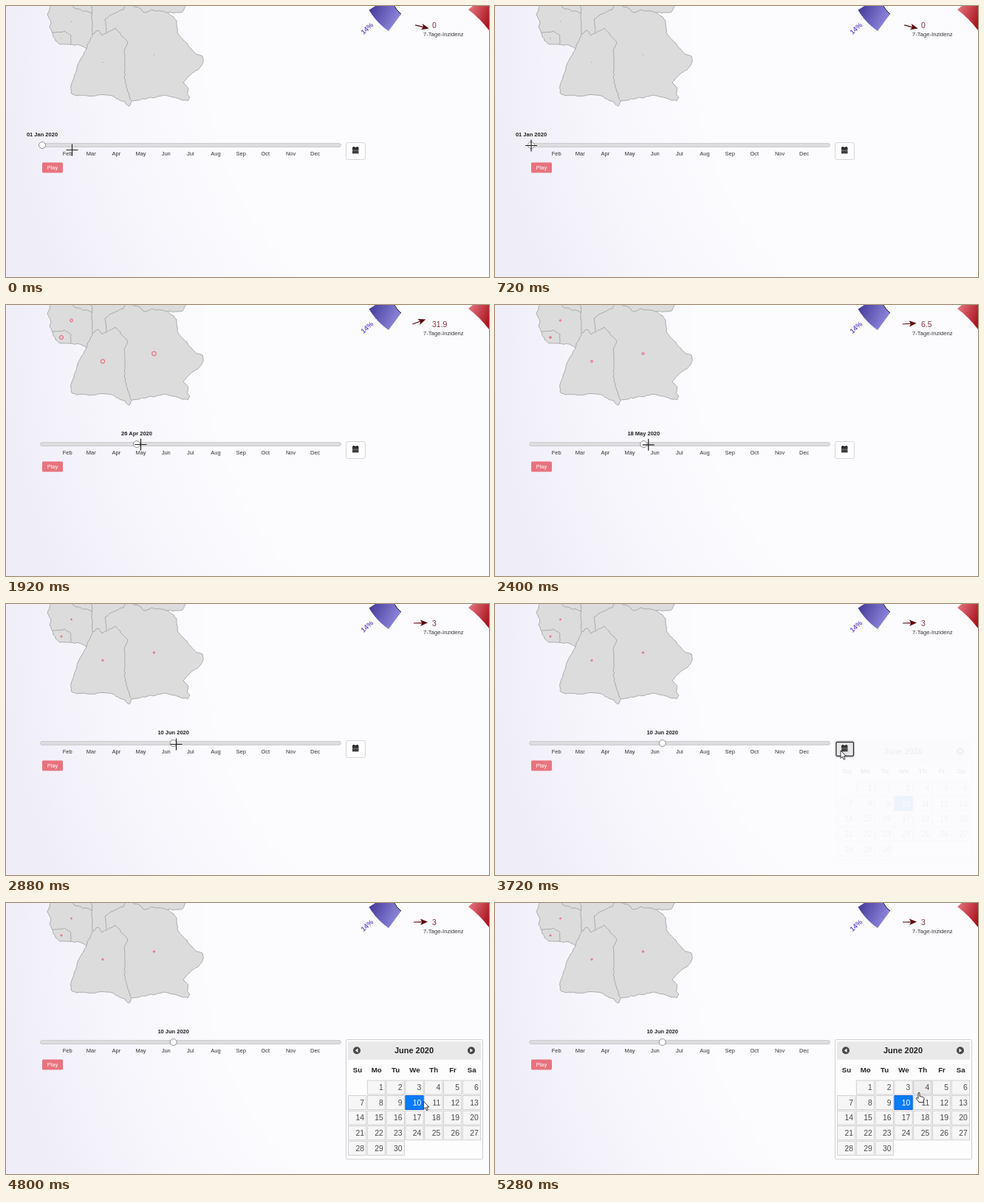
An HTML page for the animation above (5.4 s loop, 654 by 368 pixels).

```html
<!DOCTYPE html>
<html lang="de">
<head>
<meta charset="utf-8">
<title>7-Tage-Inzidenz</title>
<style>
  html, body { margin: 0; width: 100%; height: 100%; overflow: hidden; }
  body { background: radial-gradient(circle at 732px 50px, #fcfbfe 463px, #fbfafd 468px, #f7f6fc 600px, #efeef8 740px); }
  svg { display: block; width: 654px; height: 368px; }
  text { font-family: "Liberation Sans", Arial, sans-serif; fill: #333; }
  .mid { text-anchor: middle; }
  .end { text-anchor: end; }
  .bold { font-weight: bold; fill: #222; }
  .small { font-size: 7.5px; }
  .land { fill: #dcdcdc; stroke: #a4a4a4; stroke-width: .9; stroke-linejoin: round; }
  .border { fill: none; }
  .cell { fill: #f6f6f6; stroke: #cdcdcd; stroke-width: .9; }
  .hover { fill: #ebebeb; stroke: #c0c0c0; }
  .picked { fill: #087cfa; stroke: #0456d8; }
  .cursor { fill: #fff; stroke: #222; stroke-width: .9; stroke-linejoin: round; }
</style>
</head>
<body>
<svg viewBox="0 0 654 368">
  <defs>
    <linearGradient id="violet" x1="0" y1=".2" x2="1" y2=".6">
      <stop offset="0" stop-color="#463d9c"/>
      <stop offset="1" stop-color="#958de2"/>
    </linearGradient>
    <linearGradient id="red" x1="0" y1=".2" x2="1" y2=".7">
      <stop offset="0" stop-color="#e4717b"/>
      <stop offset="1" stop-color="#a8141f"/>
    </linearGradient>
  </defs>

  <g id="map"></g>

  <path fill="url(#violet)" d="M500 0L491.5 5.5Q502 23 518 34L535 11Q529 6 525.5 0Z"/>
  <path fill="none" stroke="#14122c" d="M526 0Q529 6 535 11"/>
  <path fill="url(#red)" d="M632 0L626 5Q641 16 654 33V0Z"/>
  <text class="mid bold" font-size="9.5" style="fill:#7558d2" transform="translate(491 33) rotate(-42)">14%</text>
  <path id="needle" fill="#5e0710" d="M-9.5 -.6H1.5L-.5 -4.2L9.5 0L-.5 4.2L1.5 .6H-9.5Z"/>
  <text id="value" x="577" y="29.5" font-size="10.5" style="fill:#843442"></text>
  <text x="565" y="41" font-size="7.7">7-Tage-Inzidenz</text>

  <rect x="46.5" y="186.5" width="407" height="5" rx="2.5" fill="#dddcde" stroke="#c4c3c6" stroke-width=".8"/>
  <g id="months"></g>
  <g id="handle">
    <text id="date" class="mid bold small" y="177"></text>
    <circle cy="189" r="4.5" fill="#fff" stroke="#858585" stroke-width=".9"/>
  </g>
  <rect x="49" y="212.5" width="28" height="14" rx="1.5" fill="#e8737e"/>
  <text class="mid small" x="63" y="222.3" style="fill:#fff">Play</text>

  <rect id="button" x="460.5" y="185.5" width="26" height="23" rx="2.5" stroke="#d8d8dc"/>
  <rect id="focus" x="462" y="187.5" width="23.5" height="19" rx="1.5" fill="#e9e9ea" stroke="#222" stroke-width="1.3"/>
  <path id="icon" stroke="#222" stroke-width="1.8" d="M469 193H477.500M469 195.200H477.500M469 197.300H477.500M469 199.300H477.500M471 191V193M475.500 191V193"/>

  <g id="calendar">
    <rect x="460.5" y="185.5" width="185" height="162.5" rx="2" fill="#fdfdfe" stroke="#cfcfd2"/>
    <rect x="463" y="188" width="180" height="25" rx="2" fill="#e9e9e9"/>
    <g fill="#484848"><circle cx="475" cy="200.3" r="5"/><circle cx="630" cy="200.3" r="5"/></g>
    <path fill="#fff" d="M476.5 197.6v5.4l-3.6-2.7zM628.5 197.6v5.4l3.6-2.7z"/>
    <text class="mid bold" x="552.5" y="204" font-size="11">June 2020</text>
  </g>

  <path id="cross" class="cursor" style="stroke-width:1.2" d="M-8 0H8M0 -8V8"/>
  <path id="arrow" class="cursor" d="M0 0V10.5L2.5 8.3L4.3 12.3L6 11.5L4.3 7.7H7.5Z"/>
  <path id="hand" class="cursor" d="M-1 1Q0 -.6 1 1V5.5L5.5 6.5Q7.2 7 7 9L6 13.5H0L-3.8 8.5Q-4 7 -2.5 7.3L-1 8.6Z"/>
</svg>

<script>
const LOOP = 5400, STEP = 120;
const MONTHS = 'Jan Feb Mar Apr May Jun Jul Aug Sep Oct Nov Dec'.split(' ');
const $ = id => document.getElementById(id);
const clamp = v => Math.min(1, Math.max(0, v));

function add(parent, tag, attrs, text = '') {
  const el = document.createElementNS('http://www.w3.org/2000/svg', tag);
  for (const k in attrs) el.setAttribute(k, attrs[k]);
  el.textContent = text;
  return $(parent).appendChild(el);
}

// Splits each side of a coarse line into short, slightly ragged pieces.
let seed = 7;
const jitter = () => ((seed = seed * 16807 % 2147483647) / 2147483647 - .5) * 1.8;
function region(cls, line) {
  const pts = line.split(' ').map(s => s.split(',').map(Number));
  let d = 'M' + pts[0];
  pts.slice(1).forEach(([bx, by], i) => {
    const [ax, ay] = pts[i];
    const n = Math.ceil(Math.hypot(bx - ax, by - ay) / 3.5);
    for (let j = 1; j < n; j++)
      d += `L${ax + (bx - ax) * j / n + jitter()} ${ay + (by - ay) * j / n + jitter()}`;
    d += `L${bx} ${by}`;
  });
  add('map', 'path', { class: cls, d });
}

region('land', '62,-3 56,12 61,23 59,29 67,47 73,52 100,53 109,58 97,80 88,108 88,118 96,122 140,121 161,130 ' +
  '167,136 171,129 215,121 246,129 249,124 245,119 247,112 240,104 248,95 262,84 267,76 266,68 258,66 ' +
  '233,38 231,20 219,9 239,8 245,-3');
region('land border', '63,36 79,34 88,40 87,52');
region('land border', '116,-3 116,18 117,38 109,58');
region('land border', '117,38 125,33 130,40 148,30 165,49 160,60 161,104 170,129');
region('land border', '136,36 134,18 142,12 159,5 163,-3');
region('land border', '88,-3 95,4 117,10');
region('land border', '165,-3 181,3 188,9 197,5 219,9');

// x, y, relative size
const dots = [[200.5, 66, 1], [131, 76.5, .93], [88.5, 21, .6], [75, 44, .85]]
  .map(([cx, cy, size]) => ({ size, el: add('map', 'circle', { cx, cy, 'stroke-width': .9 }) }));

const PER_DAY = 1.1035, SLIDER = 49;
const JAN1 = Date.UTC(2020, 0, 1), DAY_MS = 864e5;
MONTHS.slice(1).forEach((name, i) => {
  const day = (Date.UTC(2020, i + 1, 1) - JAN1) / DAY_MS;
  add('months', 'text', { class: 'mid small', x: SLIDER + day * PER_DAY, y: 202.7 }, name);
});

const COL = 25.8, ROW = 20.6, CELL = { width: 24.3, height: 19 };
'Su Mo Tu We Th Fr Sa'.split(' ').forEach((name, i) =>
  add('calendar', 'text', { class: 'mid bold', x: 476 + i * COL, y: 230, 'font-size': 9.7 }, name));
const cells = Array.from({ length: 30 }, (_, i) => {
  const n = i + 1, picked = n === 10;
  const x = 463.5 + n % 7 * COL, y = 241 + Math.floor(n / 7) * ROW;
  const el = add('calendar', 'rect', { x, y, ...CELL });
  add('calendar', 'text', { class: 'end', x: x + 21.5, y: y + 13.2, 'font-size': 10.4,
    style: `fill:${picked ? '#fff' : '#4c4c4c'}` }, n);
  return { el, x, y, picked };
});

// Key points of the pointer: ms, x, y
const PATH = [
  [0, 89.5, 195.5], [480, 63, 189.5], [720, 49, 189.5], [1200, 212.3, 189.5], [1320, 146, 189.5],
  [1500, 124, 189.5], [1800, 177, 189.5], [1920, 182.5, 189.5], [2760, 226.7, 190], [2880, 230.5, 190.5],
  [3000, 232, 190.5], [3240, 468, 199], [4080, 468, 199], [4320, 489.5, 237], [4680, 552, 256],
  [5040, 592, 296], [5280, 574, 257]];
const GRAB = 720, RELEASE = 2760, LAG = 120;
const HOVER = 3240, CLICK = 3600, FADE = 400;

function pointer(t) {
  const i = Math.max(1, PATH.findIndex(k => k[0] >= t));
  const [t0, x0, y0] = PATH[i - 1], [t1, x1, y1] = PATH[i];
  const p = clamp((t - t0) / (t1 - t0));
  return [x0 + (x1 - x0) * p, y0 + (y1 - y0) * p];
}

// A steep rise in March and a slower fall in May.
const sigmoid = x => 1 / (1 + Math.exp(-x));
const incidence = day => sigmoid((day - 82) / 4) * (2.9 + 36.8 * sigmoid((124.2 - day) / 6.25));

const show = (id, on) => $(id).style.display = on ? '' : 'none';
const move = (id, x, y, turn = 0) => $(id).setAttribute('transform', `translate(${x} ${y}) rotate(${turn})`);

function draw(t) {
  // The handle trails the pointer while it is dragged.
  const held = Math.min(RELEASE, Math.max(GRAB, t - LAG));
  const day = Math.round((pointer(held)[0] - SLIDER) / PER_DAY);
  const date = new Date(JAN1 + day * DAY_MS);
  move('handle', SLIDER + day * PER_DAY, 0);
  $('date').textContent = `${String(date.getUTCDate()).padStart(2, '0')} ${MONTHS[date.getUTCMonth()]} 2020`;

  const cases = +incidence(day).toFixed(1);
  $('value').textContent = cases;
  const tilt = 14 * Math.exp(-cases) - cases * .63;
  move('needle', 561.7 + tilt * .12, 26 + tilt * .16, tilt);
  for (const { el, size } of dots) {
    el.setAttribute('r', .4 + .45 * Math.sqrt(cases) * size);
    el.setAttribute('stroke', cases ? '#e0526a' : '#b5b5b5');
    el.setAttribute('fill', cases ? '#e8cdd2' : '#999');
  }

  $('button').setAttribute('fill', t >= HOVER && t < CLICK ? '#e7e7e8' : '#fdfdfe');
  show('focus', t >= CLICK);

  const fade = clamp((t - CLICK - 60) / FADE);
  $('calendar').style.opacity = .5 - Math.cos(fade * Math.PI) / 2;

  const [x, y] = pointer(t);
  let over = null;
  for (const c of cells) {
    const hit = x >= c.x && x <= c.x + CELL.width && y >= c.y && y <= c.y + CELL.height;
    if (hit) over = c;
    c.el.setAttribute('class', 'cell ' + (c.picked ? 'picked' : hit ? 'hover' : ''));
  }
  const kind = t < HOVER ? 'cross' : over ? 'hand' : 'arrow';
  for (const id of ['cross', 'arrow', 'hand']) show(id, id === kind);
  move(kind, x, y);
}

const start = performance.now();
function tick() {
  const t = (performance.now() - start) % LOOP;
  draw(Math.floor(t / STEP) * STEP);
  requestAnimationFrame(tick);
}
tick();
</script>
</body>
</html>
```
